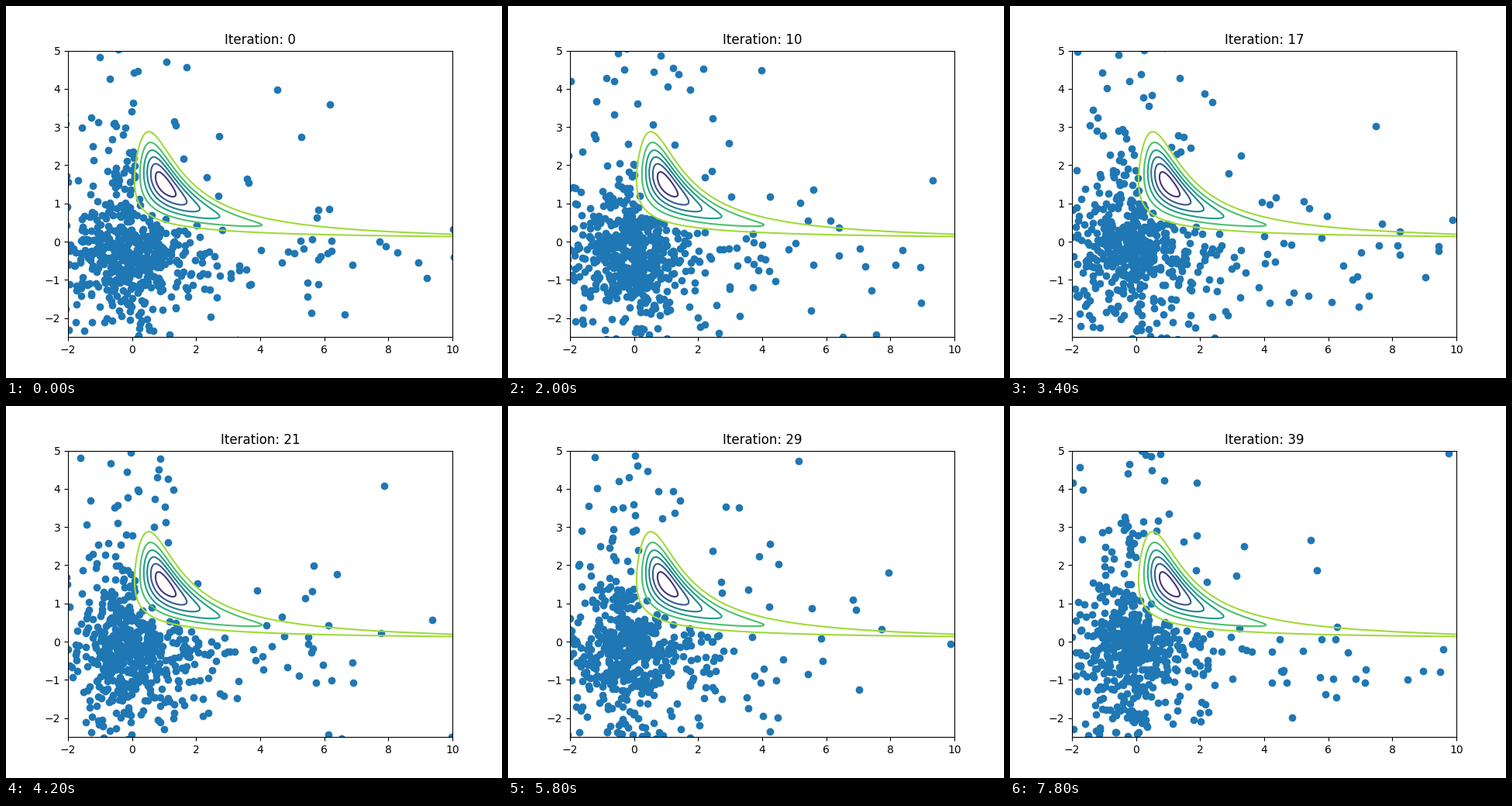
Write a matplotlib script that moves like this. It is 640 by 480 pixels and loops after 8 s.

```python
import numpy as np
import matplotlib.pyplot as plt
from matplotlib.animation import FuncAnimation

FRAMES = 40
INTERVAL = 200
N = 860
SCALE = 0.8
CENTER = np.array([-0.1, -0.18])
XLIM, YLIM = (-2, 10), (-2.5, 5)


def density(x, y):
    return np.exp(-(y - 1.5) ** 2 - (x * y - 1.5) ** 2)


def sample(i):
    """Heavy-tailed cloud that avoids the high-density region."""
    rng = np.random.default_rng(100 + i)
    pts = CENTER + SCALE * rng.standard_cauchy((N, 2))
    keep = density(*pts.T) < 0.08 + 0.25 * rng.random(N) ** 3
    return pts[keep]


fig, ax = plt.subplots(figsize=(6.4, 4.8), dpi=100)
gx, gy = np.meshgrid(np.linspace(*XLIM, 601), np.linspace(*YLIM, 501))
ax.contour(gx, gy, -density(gx, gy), levels=np.linspace(-1.05, 0, 8),
           cmap="viridis", linestyles="solid")
dots = ax.scatter([], [], color="C0")
ax.set_xlim(*XLIM)
ax.set_ylim(*YLIM)
title = ax.set_title("Iteration: 0")


def update(i):
    dots.set_offsets(sample(i))
    title.set_text(f"Iteration: {i}")
    return dots, title


anim = FuncAnimation(fig, update, frames=FRAMES, interval=INTERVAL,
                     init_func=lambda: update(0), repeat=True, repeat_delay=0)
plt.show()
```
